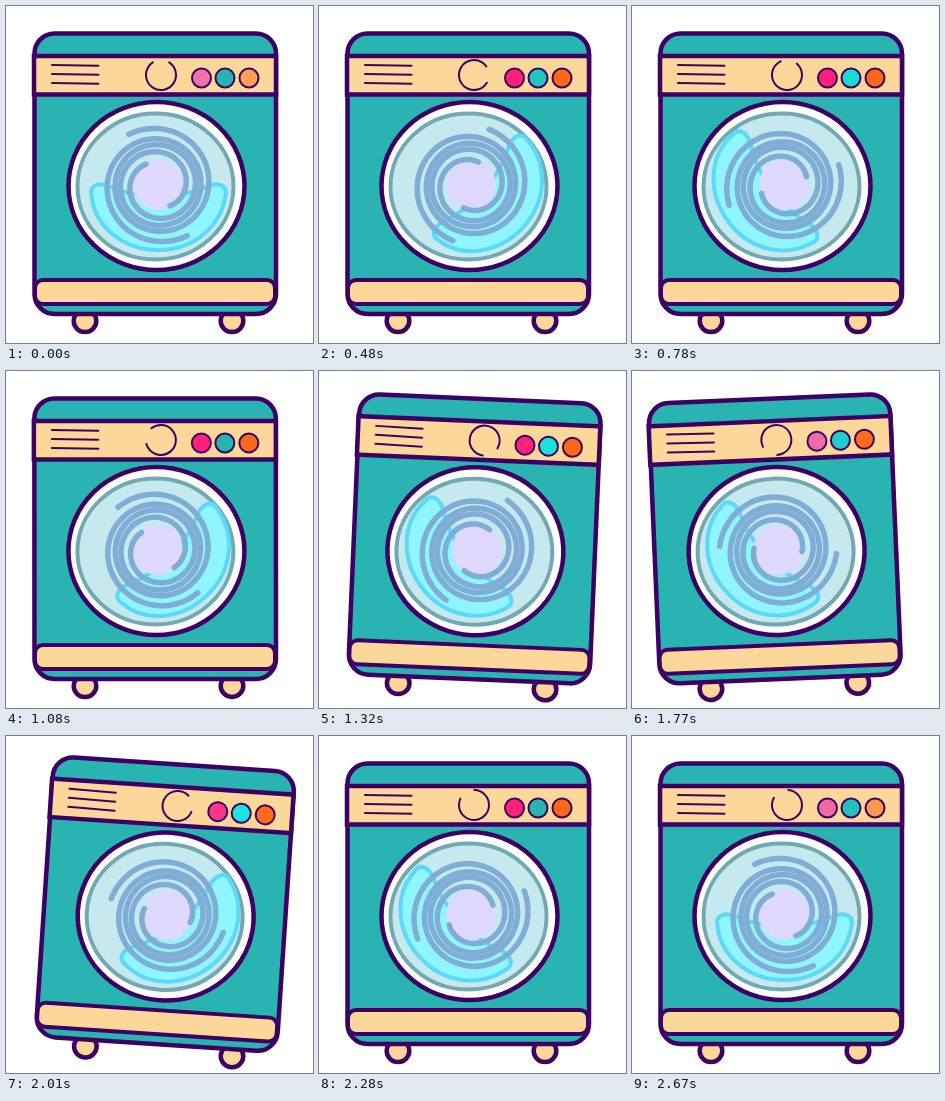
An HTML page with a canvas that plays this animation: 307x337 px, repeating every 2700 ms.

```html
<!DOCTYPE html>
<html lang="en">
<head>
<meta charset="utf-8">
<title>Washing machine</title>
<style>
html, body { margin: 0; width: 100%; height: 100%; overflow: hidden; background: #fff; }
canvas { display: block; width: 307px; height: 337px; }
</style>
</head>
<body>
<canvas id="stage"></canvas>
<script>
const W = 307, H = 337, LOOP = 2700, TICK = 30;
const INK = '#3d0063', TEAL = '#29b4b2', CREAM = '#fbd79a';
const canvas = document.getElementById('stage');
const ctx = canvas.getContext('2d');
const scale = window.devicePixelRatio || 1;
canvas.width = Math.round(W * scale);
canvas.height = Math.round(H * scale);

const rad = deg => deg * Math.PI / 180;
const mix = (a, b, u) => a + (b - a) * u;
const ease = u => (1 - Math.cos(Math.PI * u)) / 2;

// Rocks between alternating extremes, beginning and ending at rest.
function swing(n, start, step, count, amp) {
  const stop = i => i <= 0 || i >= count ? 0 : (i % 2 ? -amp : amp);
  const p = (n - start) / step, i = Math.floor(p);
  return mix(stop(i), stop(i + 1), ease(p - i));
}

// Smooth curve through [tick, value] keys, flat at both ends.
function curve(keys, n) {
  const last = keys.length - 1;
  if (n >= keys[last][0]) return keys[last][1];
  const i = keys.findIndex((k, j) => j < last && n < keys[j + 1][0]);
  const slope = j => j === 0 || j === last ? 0 :
    (keys[j + 1][1] - keys[j - 1][1]) / (keys[j + 1][0] - keys[j - 1][0]);
  const [t0, a] = keys[i], [t1, b] = keys[i + 1];
  const d = t1 - t0, u = (n - t0) / d, v = 1 - u;
  return a * v * v * (1 + 2 * u) + b * u * u * (3 - 2 * u) +
    d * (slope(i) * u * v * v - slope(i + 1) * u * u * v);
}

const SPIN = [[0, 0], [16, 48], [36, 167], [50, 312], [59, 486], [67, 673], [86, 900]];
const TEAL_GLOW = [[0, 0], [10, 1], [20, 0], [29, 1], [36, 0], [43, 1], [50, 0],
  [59, 0.5], [67, 1], [75, 0], [82, 1], [89, 0.25], [90, 0]];

function blend(from, to, u) {
  return `rgb(${from.map((c, i) => Math.round(mix(c, to[i], u))).join(',')})`;
}

function paint(fill, stroke, width) {
  if (fill) { ctx.fillStyle = fill; ctx.fill(); }
  if (stroke) { ctx.strokeStyle = stroke; ctx.lineWidth = width; ctx.stroke(); }
}

function box(x, y, w, h, r, fill, width) {
  ctx.beginPath();
  ctx.roundRect(x, y, w, h, r);
  paint(fill, INK, width);
}

function oval(x, y, rx, ry, fill, stroke, width) {
  ctx.beginPath();
  ctx.ellipse(x, y, rx, ry, 0, 0, 2 * Math.PI);
  paint(fill, stroke, width);
}

function turned(x, y, deg, draw) {
  ctx.save();
  ctx.translate(x, y);
  ctx.rotate(rad(deg));
  draw();
  ctx.restore();
}

function drawWater() {
  ctx.beginPath();
  ctx.moveTo(-67, 16);
  ctx.bezierCurveTo(-70, 4, -58, 2, -47, 7);
  ctx.bezierCurveTo(-22, 19, 22, 19, 47, 7);
  ctx.bezierCurveTo(58, 2, 70, 4, 67, 16);
  ctx.bezierCurveTo(62, 46, 36, 70, 0, 70);
  ctx.bezierCurveTo(-36, 70, -64, 46, -67, 16);
  ctx.closePath();
  paint('#8ff6ff', '#5bd9fb', 4);
}

// Two arms whose coils lie tighter halfway out than at either end.
function drawSpiral() {
  oval(0, 0, 25, 25, '#dfd8ff');
  for (const arm of [0, 180]) {
    ctx.beginPath();
    for (let a = 0; a <= 720; a += 6) {
      const s = a / 720, t = rad(arm + 60 - a);
      const r = 24 + 34.5 * (s + 0.065 * Math.sin(2 * Math.PI * s));
      ctx.lineTo(r * Math.cos(t), r * Math.sin(t));
    }
    paint(null, '#80add5', 5.5);
  }
}

function drawPanel(n) {
  box(28, 50, 242, 38.5, 0, CREAM, 4.5);
  for (const y of [59, 68, 77]) {
    ctx.beginPath();
    ctx.moveTo(46, y);
    ctx.lineTo(92.5, y + 0.8);
    paint(null, INK, 2);
  }
  turned(155, 69, 28 * n - 90, () => {
    ctx.beginPath();
    ctx.arc(0, 0, 15, rad(33), rad(327));
    paint(null, INK, 2);
  });
  const pulse = (1 - Math.cos(2 * Math.PI * n / 10)) / 2;
  const orange = n > 55 && n < 75 ? Math.max(pulse, 0.87) : pulse;
  const lights = [
    [195.5, blend([240, 114, 170], [255, 25, 115], pulse)],
    [219, blend([39, 180, 176], [26, 230, 222], curve(TEAL_GLOW, n))],
    [243, blend([255, 158, 85], [255, 98, 18], orange)]
  ];
  for (const [x, color] of lights) oval(x, 72, 9.5, 9.5, color, INK, 2);
}

function drawMachine(n) {
  for (const x of [79, 226]) oval(x, 315, 11.3, 11, CREAM, INK, 4.5);
  box(28.5, 27.5, 241.5, 280.5, 20, TEAL, 4.5);
  drawPanel(n);
  box(29, 274, 240, 24, 8, CREAM, 4);

  oval(150.5, 180, 88, 84, '#fff', INK, 4.5);
  oval(149.5, 180.5, 78, 73, '#c6e9ef', '#72a9b1', 4);
  turned(152.5, 174, swing(n, 0, 8.6, 10, -54), drawWater);
  turned(152, 179, curve(SPIN, n), drawSpiral);
}

function frame(now) {
  const n = Math.floor((now % LOOP) / TICK);
  ctx.setTransform(scale, 0, 0, scale, 0, 0);
  ctx.fillStyle = '#fff';
  ctx.fillRect(0, 0, W, H);
  ctx.lineCap = 'round';
  turned(148, 318, swing(n, 35.75, 5, 8, 5.4), () => {
    ctx.translate(-148, -318);
    drawMachine(n);
  });
}

const begun = performance.now();
function loop() {
  frame(performance.now() - begun);
  requestAnimationFrame(loop);
}
loop();
</script>
</body>
</html>
```
